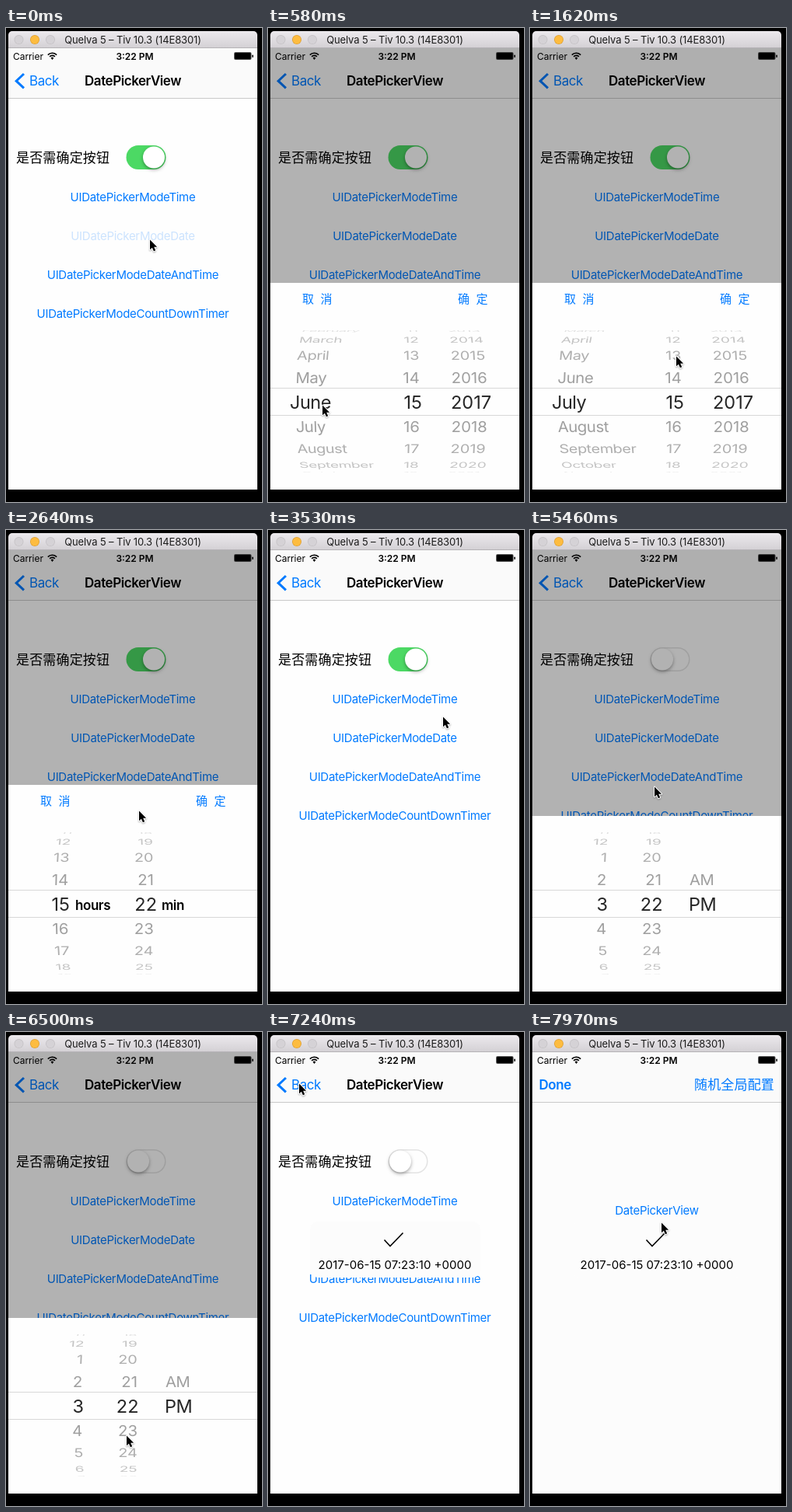
An HTML page with a canvas that plays this animation: 329x610 px, repeating every 8000 ms.

```html
<!DOCTYPE html>
<html lang="en">
<head>
<meta charset="utf-8">
<title>Date picker demo</title>
<style>
html, body { margin: 0; width: 100%; height: 100%; overflow: hidden; background: #000; }
canvas { display: block; width: 329px; height: 610px; }
</style>
</head>
<body>
<canvas id="stage"></canvas>
<script>
const W = 329, H = 610, LOOP = 8000, STEP = 147.5;
const LEFT = 3, TOP = 26, RIGHT = 323, BOTTOM = 594, MID = 163;
const BLUE = '#007aff';
const FONT = 'Inter, "Noto Sans CJK SC", "Noto Sans CJK", sans-serif';
const canvas = document.getElementById('stage');
const dpr = window.devicePixelRatio || 1;
canvas.width = W * dpr;
canvas.height = H * dpr;
const ctx = canvas.getContext('2d');

const clamp = v => Math.max(0, Math.min(1, v));
const ease = v => v * v * (3 - 2 * v);
const ramp = (n, a, b) => ease(clamp((n - a) / (b - a)));
const mod = (a, b) => ((a % b) + b) % b;
const pad = v => String(v).padStart(2, '0');

function text(str, x, y, size, { color = '#000', align = 'left', weight = 400, track = -0.026 } = {}) {
  ctx.font = `${weight} ${size}px ${FONT}`;
  ctx.letterSpacing = `${(track * size).toFixed(2)}px`;
  ctx.textAlign = align;
  ctx.fillStyle = color;
  ctx.fillText(str, x, y + size * 0.36);
}

function rect(x, y, w, h, color) {
  ctx.fillStyle = color;
  ctx.fillRect(x, y, w, h);
}

function disc(x, y, r, color) {
  ctx.fillStyle = color;
  ctx.beginPath();
  ctx.arc(x, y, r, 0, 7);
  ctx.fill();
}

function pill(x, y, w, h, r, color) {
  ctx.fillStyle = color;
  ctx.beginPath();
  ctx.roundRect(x, y, w, h, r);
  ctx.fill();
}

function line(points, width, color) {
  ctx.strokeStyle = color;
  ctx.lineWidth = width;
  ctx.beginPath();
  points.forEach(p => ctx.lineTo(...p));
  ctx.stroke();
}

function clipped(x, y, w, h, draw) {
  ctx.save();
  ctx.beginPath();
  ctx.rect(x, y, w, h);
  ctx.clip();
  draw();
  ctx.restore();
}

// Picker sheets: open and close steps, and wheel columns
const MONTHS = 'January February March April May June July August September October November December'.split(' ');
const DAYS = ['Sun', 'Mon', 'Tue', 'Wed', 'Thu', 'Fri', 'Sat'];
const hour12 = k => mod(k - 1, 12) + 1;
const minute = k => pad(mod(k, 60));
const halfDay = k => ['AM', 'PM'][k] || '';
const dayLabel = k => k === 15 ? 'Today' : `${DAYS[mod(k + 3, 7)]} Jun ${k}`;
const col = (label, pos, align, x, selX) => ({ label, pos, align, x, selX });

const SHEETS = [
  { start: 0, end: 15, button: 1, confirm: true, cols: n => [
    col(k => MONTHS[mod(k, 12)], 5 + ramp(n, 5, 8), 'left', 35, 28),
    col(k => mod(k - 1, 31) + 1, 15, 'right', 195, 198),
    col(k => k, 2017, 'left', 236, 235)] },
  { start: 16, end: 23, button: 3, confirm: true, units: true, cols: () => [
    col(k => mod(k, 24), 15, 'right', 80, 82),
    col(k => mod(k, 60), 22, 'right', 190, 194)] },
  { start: 26, end: 31, button: 2, confirm: true, cols: () => [
    col(dayLabel, 15, 'right', 142, 145),
    col(hour12, 3, 'right', 182, 184),
    col(minute, 22, 'right', 227, 229),
    col(halfDay, 1, 'left', 251, 251)] },
  { start: 35, end: 48, button: 0, confirm: false, cols: n => [
    col(hour12, 3, 'right', 98, 100),
    col(minute, 22 + ramp(n, 44, 46), 'right', 169, 170.5),
    col(halfDay, 1, 'left', 205, 204)] }
];

// Rows sit on a cylinder: they flatten, shrink and lean to the middle as they recede
function wheel({ label, pos, align, x, selX }) {
  const radius = 93, depth = 0.08, base = Math.round(pos);
  for (let k = base - 4; k <= base + 4; k++) {
    const d = k - pos, angle = d * Math.PI / 9, c = Math.cos(angle), s = Math.sin(angle);
    if (c <= 0) continue;
    const str = String(label(k)), picked = Math.abs(d) < 0.5;
    const track = /\d/.test(str) ? 0 : -0.022;
    const offset = (picked ? selX : x) - MID;
    ctx.save();
    ctx.translate(MID + offset * (1 - depth * (1 - c)), 481.6 + radius * s);
    ctx.transform(1 - 0.13 * (1 - c), 0, -offset * depth * s / radius, c, 0, 0);
    ctx.globalAlpha = picked ? 1 : 0.15 + 0.75 * c;
    text(str, 0, 0, picked ? 23.5 : 20.5, { color: picked ? '#262626' : '#8f8f8f', align, track });
    ctx.restore();
  }
}

function drawSheet(sheet, n) {
  const open = clamp(Math.min((n - sheet.start) / 2, (sheet.end - n) / 2));
  if (!open) return;
  rect(LEFT, TOP, RIGHT - LEFT, BOTTOM - TOP, `rgba(0,0,0,${0.3 * open})`);
  const top = sheet.confirm ? 328 : 368;
  ctx.save();
  ctx.translate(0, (1 - open) * (BOTTOM - top));
  rect(LEFT, top, RIGHT - LEFT, BOTTOM - top, '#fefefe');
  if (sheet.confirm) {
    text('取  消', 44, 348.5, 15, { color: BLUE, track: 0 });
    text('确  定', 244, 348.5, 15, { color: BLUE, track: 0 });
  }
  rect(LEFT, 463, RIGHT - LEFT, 1, '#d8d8d8');
  rect(LEFT, 498, RIGHT - LEFT, 1, '#d8d8d8');
  clipped(LEFT, 389, RIGHT - LEFT, 183, () => sheet.cols(n).forEach(wheel));
  if (sheet.units) {
    text('hours', 89, 482.4, 17, { weight: 600 });
    text('min', 200, 482.4, 17, { weight: 600 });
  }
  ctx.restore();
}

function drawSwitch(on) {
  if (on) {
    pill(154.5, 151, 51, 31, 15.5, '#4cd964');
  } else {
    pill(154.5, 151, 51, 31, 15.5, '#e3e3e3');
    pill(156, 152.5, 48, 28, 14, '#fefefe');
  }
  ctx.save();
  ctx.shadowColor = 'rgba(0,0,0,.35)';
  ctx.shadowBlur = 4 * dpr;
  ctx.shadowOffsetY = 2 * dpr;
  disc(on ? 190 : 170, 166.5, 14, '#fff');
  ctx.restore();
}

function pageBase(color) {
  rect(LEFT, TOP, RIGHT - LEFT, BOTTOM - TOP, color);
  rect(LEFT, TOP, RIGHT - LEFT, 64, '#fafafa');
  rect(LEFT, 90, RIGHT - LEFT, 1, '#c9c9c9');
}

function drawHome() {
  pageBase('#fcfcfc');
  text('Done', 11.5, 68, 17, { color: BLUE, weight: 600 });
  text('随机全局配置', 314, 68, 17, { color: BLUE, align: 'right', track: 0.01 });
  text('DatePickerView', MID, 229.6, 15, { color: BLUE, align: 'center', track: -0.02 });
}

function drawPickers(n) {
  pageBase('#fefefe');
  line([[23, 59], [13.2, 68.2], [23, 77.4]], 3, BLUE);
  text('Back', 30, 68.2, 17, { color: BLUE });
  text('DatePickerView', MID, 68.2, 17, { weight: 600, align: 'center' });
  text('是否需确定按钮', 13, 166.4, 17, { track: 0.01 });
  drawSwitch(n < 33);
  ['Time', 'Date', 'DateAndTime', 'CountDownTimer'].forEach((mode, i) => {
    const pressed = SHEETS.some(s => s.button === i && s.start === n);
    ctx.globalAlpha = pressed ? 0.2 : 1;
    text('UIDatePickerMode' + mode, MID, 217.6 + 50 * i, 15, { color: BLUE, align: 'center', track: -0.02 });
    ctx.globalAlpha = 1;
  });
}

function drawStatus() {
  text('Carrier', 9, 36.5, 12, { track: -0.005 });
  ctx.strokeStyle = '#000';
  ctx.lineWidth = 1.6;
  [4.6, 7.8].forEach(r => {
    ctx.beginPath();
    ctx.arc(59.5, 40, r, -Math.PI * 0.76, -Math.PI * 0.24);
    ctx.stroke();
  });
  ctx.fillStyle = '#000';
  ctx.beginPath();
  ctx.moveTo(59.5, 41);
  ctx.arc(59.5, 40, 2.4, -Math.PI * 0.78, -Math.PI * 0.22);
  ctx.fill();
  text('3:22 PM', 165.5, 36.5, 12, { weight: 600, align: 'center', track: 0 });
  pill(293, 31, 22.5, 10, 2, '#555');
  pill(294, 32, 20.5, 8, 1, '#000');
  pill(316.3, 34.5, 1.5, 3.5, 0.7, '#000');
}

function drawTitleBar() {
  const shade = ctx.createLinearGradient(0, 4, 0, 26);
  shade.addColorStop(0, '#ece9ed');
  shade.addColorStop(1, '#d3d0d4');
  pill(LEFT, 4, RIGHT - LEFT, 22, [5, 5, 0, 0], shade);
  rect(LEFT, 25, RIGHT - LEFT, 1, '#b5b2b6');
  [['#c4c1c5', '#d5d2d6', 16.5], ['#dfa032', '#fdbc40', 37], ['#c4c1c5', '#d5d2d6', 57]].forEach(([edge, fill, x]) => {
    disc(x, 15, 6, edge);
    disc(x, 15, 5.2, fill);
  });
  text('Quelva 5 – Tiv 10.3 (14E8301)', MID, 15.5, 13, { align: 'center', color: '#1c1c1c', track: -0.01 });
}

function drawToast() {
  pill(54, 244, 219, 72, 10, '#fcfcfc');
  line([[149.5, 267.5], [157, 275.5], [173.5, 258.5]], 1.6, '#000');
  text('2017-06-15 07:23:10 +0000', MID, 299.4, 15, { align: 'center', track: 0 });
}

// Pointer path: step, x, y
const PATH = [
  [0, 185, 272], [2, 175, 330], [4, 70, 485], [5, 70, 485], [8, 75, 452], [11, 188, 422],
  [13, 262, 346], [14, 255, 348], [16, 168, 364], [18, 171, 361], [19, 190, 360], [21, 262, 346],
  [22, 255, 310], [24, 225, 240], [26, 168, 316], [27, 175, 322], [29, 262, 346], [31, 246, 243],
  [33, 180, 166], [35, 165, 216], [37, 160, 330], [41, 156, 500], [44, 155, 519], [46, 156, 485],
  [47, 150, 300], [49, 40, 66], [51, 45, 70], [54, 169, 245]
];

function drawPointer(n) {
  let i = PATH.findIndex(p => p[0] >= n);
  if (i < 0) i = PATH.length - 1;
  const b = PATH[i], a = PATH[Math.max(0, i - 1)];
  const u = b === a ? 0 : clamp((n - a[0]) / (b[0] - a[0]));
  ctx.save();
  ctx.translate(a[1] + (b[1] - a[1]) * u, a[2] + (b[2] - a[2]) * u + 0.5);
  ctx.scale(0.88, 0.88);
  ctx.beginPath();
  [[0, 0], [0, 14.5], [3.3, 11.6], [5.6, 16.8], [8.2, 15.7], [5.9, 10.5], [10.4, 10.5]].forEach(p => ctx.lineTo(...p));
  ctx.closePath();
  ctx.lineJoin = 'round';
  ctx.strokeStyle = '#fff';
  ctx.lineWidth = 2.2;
  ctx.shadowColor = 'rgba(0,0,0,.3)';
  ctx.shadowBlur = 2 * dpr;
  ctx.shadowOffsetY = dpr;
  ctx.stroke();
  ctx.shadowColor = 'transparent';
  ctx.fillStyle = '#000';
  ctx.fill();
  ctx.restore();
}

function draw(time) {
  const n = Math.floor((time % LOOP) / STEP + 0.11);
  ctx.setTransform(dpr, 0, 0, dpr, 0, 0);
  rect(0, 0, W, H, '#000');
  drawTitleBar();
  clipped(LEFT, TOP, RIGHT - LEFT, BOTTOM - TOP, () => {
    const slide = ramp(n, 49, 52) * (RIGHT - LEFT);
    if (slide) {
      ctx.save();
      ctx.translate((slide - (RIGHT - LEFT)) * 0.3, 0);
      drawHome();
      ctx.restore();
    }
    if (slide < RIGHT - LEFT) {
      ctx.save();
      ctx.translate(slide, 0);
      drawPickers(n);
      ctx.restore();
    }
    drawStatus();
    SHEETS.forEach(s => drawSheet(s, n));
    if (n >= 48) drawToast();
  });
  drawPointer(n);
}

const begin = performance.now();
function tick() {
  draw(performance.now() - begin);
  requestAnimationFrame(tick);
}
tick();
</script>
</body>
</html>
```
